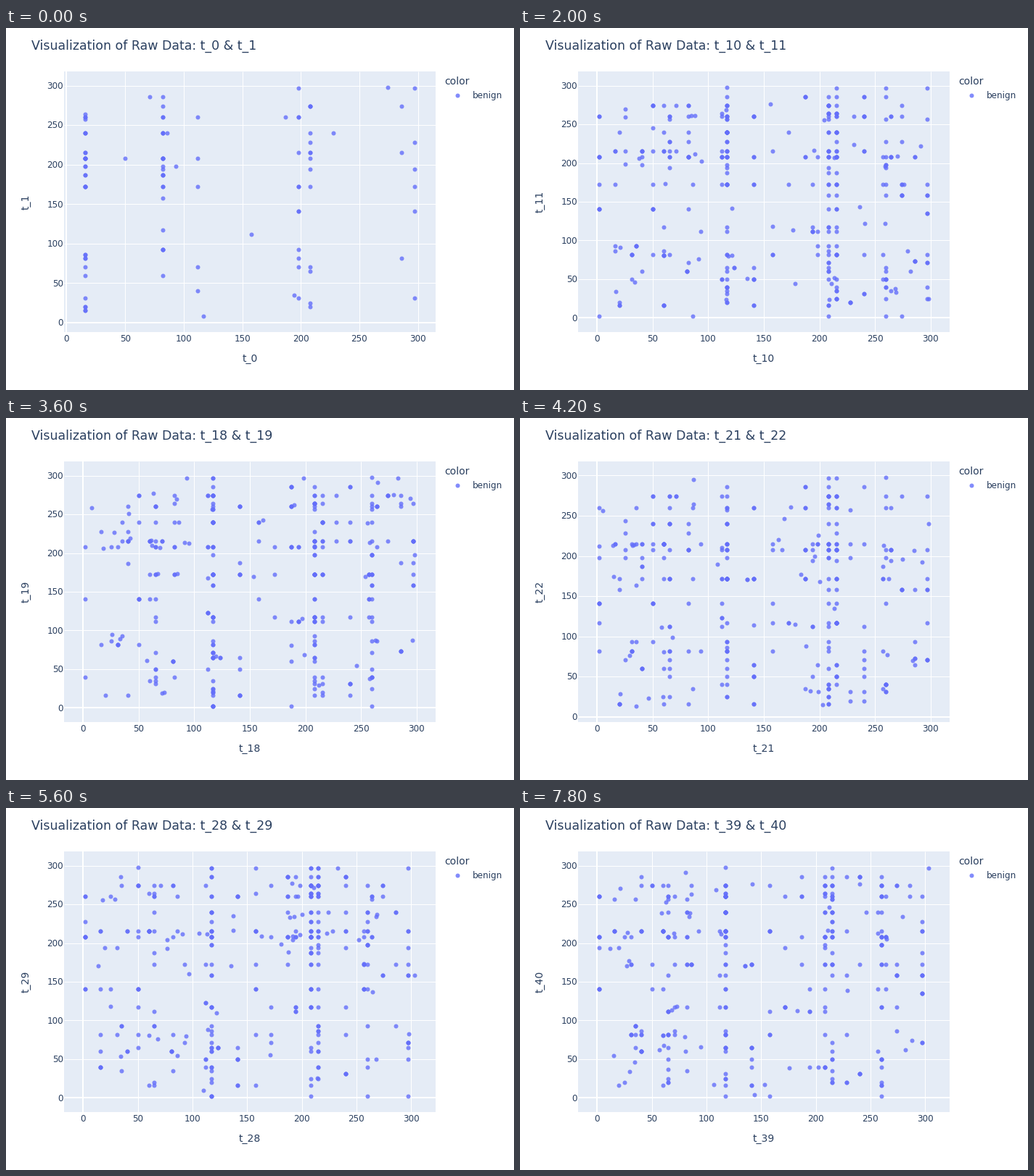
A matplotlib script for the animation above (8 s loop, 700 by 500 pixels).

```python
import numpy as np
import matplotlib
import matplotlib.pyplot as plt
from matplotlib.animation import FuncAnimation
from matplotlib.collections import LineCollection
from matplotlib.patches import Rectangle

W, H, DPI = 700, 500, 100
PX = 72 / DPI
FRAMES, INTERVAL = 40, 200
LEFT, RIGHT, TOP, BOTTOM = 80, 592, 60, 420
INK, DOT, PANEL = "#2a3f5f", "#636efa", "#e5ecf6"
TICKS = np.arange(0, 301, 50)

matplotlib.rcParams["font.family"] = "DejaVu Sans"

# Series values fall mostly on these levels; some columns and rows are busier
LEVELS = np.array([2, 16, 20, 25, 31, 35, 40, 50, 60, 65, 71, 82, 86, 93, 112,
                   117, 141, 158, 172, 187, 194, 198, 208, 215, 228, 240, 257,
                   260, 264, 274, 286, 297])
BUSY_COLS = {117: 22, 208: 16, 215: 16, 65: 7, 260: 7, 82: 3, 240: 3, 297: 3}
BUSY_ROWS = {215: 4, 208: 4, 172: 4, 260: 3, 240: 3, 274: 3, 117: 2, 82: 2}
START_COLS = {16: 70, 82: 70, 198: 35, 208: 40, 112: 20, 286: 15, 297: 15}
STEADY = [(60, 81), (81, 60), (112, 123), (123, 65), (135, 171), (141, 65),
          (158, 215), (172, 117), (187, 208), (274, 158), (286, 73), (297, 135)]

# Lowest and highest value of a series, where not the usual 2 and 298
LOW = {0: 16, 1: 8, 15: 8, 16: 14, 22: 13}
HIGH = {0: 297, 15: 297, 16: 303, 28: 303, 34: 306, 39: 303}


def extent(i):
    return LOW.get(i, 2), HIGH.get(i, 298)


def pick(rng, count, busy):
    """Draw levels, favouring the busy ones."""
    weight = np.array([busy.get(v, 1) for v in LEVELS.tolist()], float)
    return rng.choice(LEVELS, count, p=weight / weight.sum())


def draw_pairs(rng, count, cols):
    return np.column_stack([pick(rng, count, cols), pick(rng, count, BUSY_ROWS)])


HABITS = np.vstack([STEADY, draw_pairs(np.random.default_rng(7), 50, {})])


def pairs(n):
    """Points of (t_n, t_n+1); repeated points overlap and darken."""
    rng = np.random.default_rng(90 + n)
    if n == 0:
        xy = draw_pairs(rng, 105, START_COLS)
    else:
        habits = np.repeat(HABITS, rng.integers(0, 4, len(HABITS)), axis=0)
        fresh = draw_pairs(rng, min(210, 130 + 20 * n), BUSY_COLS)
        stray = draw_pairs(rng, 45, {})
        stray += rng.integers(-6, 7, stray.shape)
        xy = np.vstack([habits, fresh, stray])

    (x0, x1), (y0, y1) = extent(n), extent(n + 1)
    inside = ((xy >= (x0, y0)) & (xy <= (x1, y1))).all(axis=1)
    u, v = pick(rng, 2, BUSY_COLS), pick(rng, 2, BUSY_ROWS)
    return np.vstack([xy[inside], [(x0, v[0]), (x1, v[1]), (u[0], y0), (u[1], y1)]])


def scaler(bounds, first, last):
    """Map data to pixels, leaving the same margin at both ends."""
    lo, hi = bounds
    return lambda v: first + (v - lo) * (last - first) / (hi - lo)


fig = plt.figure(figsize=(W / DPI, H / DPI), dpi=DPI, facecolor="white")
ax = fig.add_axes([0, 0, 1, 1])
ax.set_xlim(0, W)
ax.set_ylim(H, 0)
ax.axis("off")


def label(x, y, text, size, ha="left", **kw):
    return ax.text(x, y, text, fontsize=size * PX, color=INK, ha=ha, va="baseline", **kw)


def dots(x, y):
    return ax.scatter(x, y, s=(6 * PX) ** 2, c=DOT, alpha=0.8, linewidths=0, zorder=3)


ax.add_patch(Rectangle((LEFT, TOP), RIGHT - LEFT, BOTTOM - TOP, fc=PANEL, lw=0))
widths = [(1 + (t == 0)) * PX for t in TICKS] * 2
grid = ax.add_collection(LineCollection([], colors="white", linewidths=widths, zorder=2),
                         autolim=False)
points = dots([0], [0])

title = label(35, 30, "", 17.4)
x_title = label(336, 461, "", 14, ha="center")
y_title = label(31, 240, "", 14, ha="center", rotation=90, rotation_mode="anchor")
x_labels = [label(0, 433.3, str(t), 12, ha="center") for t in TICKS]
y_labels = [label(79, 0, str(t), 12, ha="right") for t in TICKS]

label(604, 78, "color", 14)
label(642.5, 97.3, "benign", 12)
dots([622], [93])


def draw(n):
    to_x = scaler(extent(n), 109.3, 562.7)
    to_y = scaler(extent(n + 1), 398.3, 81.7)
    x, y = pairs(n).T
    points.set_offsets(np.column_stack([to_x(x), to_y(y)]))

    xs, ys = to_x(TICKS), to_y(TICKS)
    grid.set_segments([[(x, TOP), (x, BOTTOM)] for x in xs]
                      + [[(LEFT, y), (RIGHT, y)] for y in ys])
    for text, x in zip(x_labels, xs):
        text.set_x(x)
    for text, y in zip(y_labels, ys):
        text.set_y(y + 4.3)

    title.set_text(f"Visualization of Raw Data: t_{n} & t_{n + 1}")
    x_title.set_text(f"t_{n}")
    y_title.set_text(f"t_{n + 1}")
    return []


anim = FuncAnimation(fig, draw, frames=FRAMES, interval=INTERVAL,
                     init_func=lambda: draw(0), repeat=True, repeat_delay=0)
plt.show()
```
